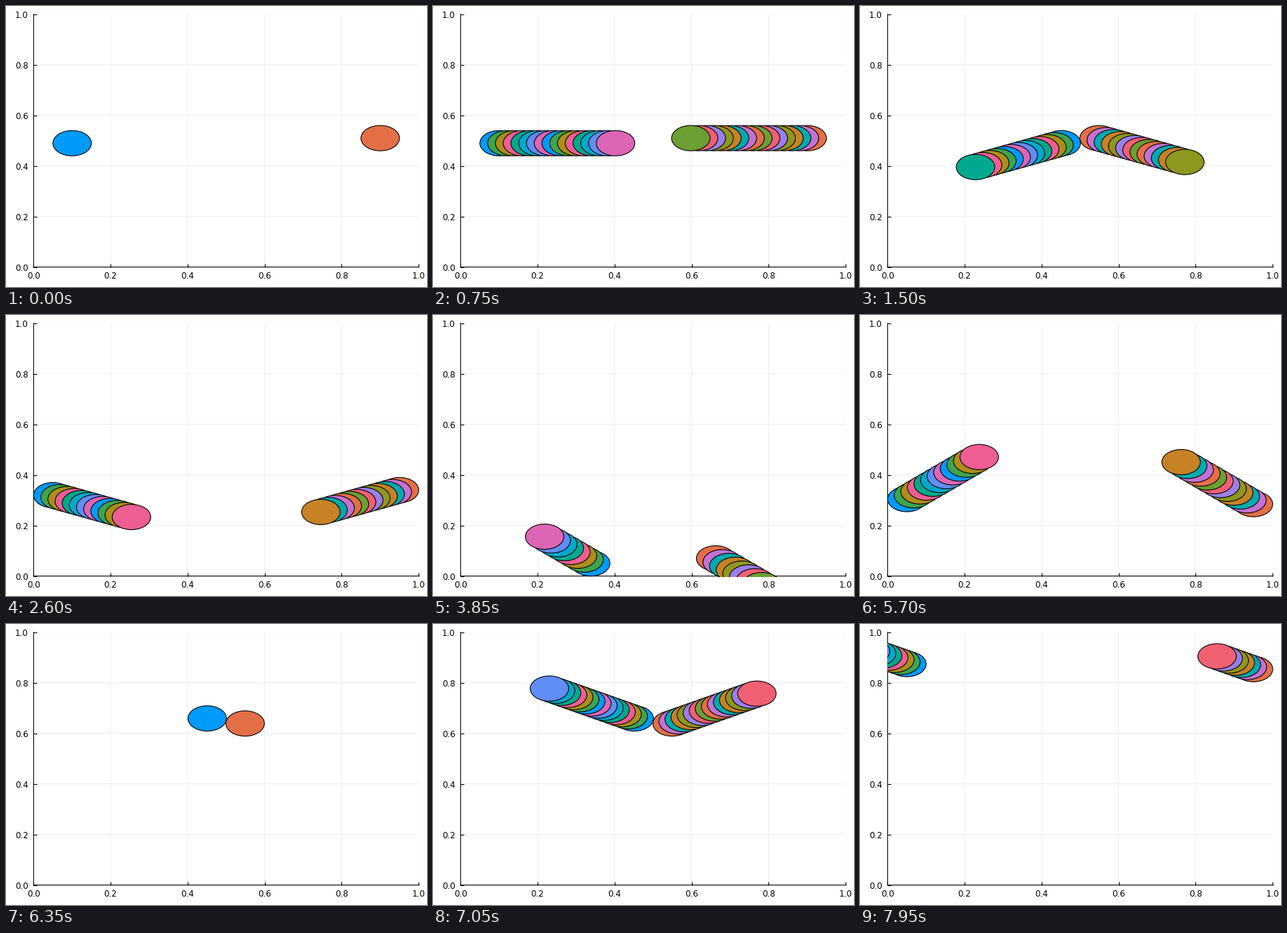
Recreate the animation shown at these times as a matplotlib script. Size 600 px wide and 400 px high, loop 8 s.

```python
from math import floor, sqrt

import matplotlib.pyplot as plt
import numpy as np
from matplotlib.animation import FuncAnimation
from matplotlib.patches import Ellipse
from matplotlib.transforms import Bbox

W, H, DPI = 600, 400, 100
LEFT, RIGHT, TOP, BOTTOM = 39.37, 588.19, 11.81, 371.6
FRAMES, STEP_MS = 160, 50
PX = 72 / DPI

RADIUS = 0.05
SPEED = 0.02015
OFFSET = 0.02       # height difference of the two balls
HIT = 0.1004        # distance of the centres at a collision
NORMAL = np.array([sqrt(HIT**2 - OFFSET**2), OFFSET]) / HIT
MEET = 0.5 - HIT * NORMAL[0] / 2

PALETTE = [
    "#009AFA", "#E36F47", "#3EA44E", "#C371D2", "#AC8E18", "#00AAAE",
    "#ED5E93", "#C68225", "#00A98D", "#8E971E", "#00A9CC", "#9B7FE9",
    "#618DF6", "#F06073", "#DD65B6", "#6C9F33",
]


class Motion:
    """Straight flights between collisions; rows are left and right ball."""

    def __init__(self):
        self.pos = np.array([[0.1, 0.5 - OFFSET / 2], [0.9, 0.5 + OFFSET / 2]])
        self.vel = np.array([[SPEED, 0.0], [-SPEED, 0.0]])
        self.frame = 0
        self.flights = []

    def time_to(self, target, ball=0, axis=0):
        return (target - self.pos[ball, axis]) / self.vel[ball, axis]

    def fly(self, shown, moved=None):
        """Show a flight for some time; the state may advance by less."""
        self.flights.append((self.frame, self.pos.copy(), self.vel.copy()))
        self.frame += floor(shown) + 1
        self.pos += self.vel * (shown if moved is None else moved)

    def bump(self):
        self.fly(self.time_to(MEET))
        push = 2 * self.vel[0, 0] * NORMAL[0] * NORMAL
        self.vel -= [push, push * [-1, 1]]

    def run(self):
        self.bump()
        self.fly(self.time_to(RADIUS))
        self.fly(0)
        self.vel[:, 0] *= -1
        self.bump()
        self.fly(self.time_to(RADIUS, axis=1))
        self.vel[0, 1] *= -1
        # The right ball sinks through the floor, then is set back to it.
        self.fly(self.time_to(RADIUS), self.time_to(RADIUS, ball=1, axis=1))
        self.vel[1, 1] *= -1
        self.fly(self.time_to(RADIUS))
        self.vel[:, 0] *= -1
        self.bump()
        self.fly(self.time_to(RADIUS))
        # Only the right ball bounces; the left one slips through the wall.
        self.vel[1, 0] *= -1
        self.fly(FRAMES - self.frame)
        return self.flights


flights = Motion().run()
starts = [flight[0] for flight in flights] + [FRAMES]
longest = max(np.diff(starts))

plt.rcParams.update({"font.family": "DejaVu Sans", "path.snap": False})
fig = plt.figure(figsize=(W / DPI, H / DPI), dpi=DPI, facecolor="white")
ax = fig.add_axes([LEFT / W, 1 - BOTTOM / H,
                   (RIGHT - LEFT) / W, (BOTTOM - TOP) / H])
clip = Bbox.from_extents(floor(LEFT), H - floor(BOTTOM) - 2,
                         floor(RIGHT) + 1, H - floor(TOP))


def style_axes():
    ticks = np.arange(6) / 5
    ax.set(xlim=(0, 1), ylim=(0, 1), xticks=ticks, yticks=ticks)
    ax.set_axisbelow(True)
    ax.grid(color="black", alpha=0.1, linewidth=0.6 * PX)
    ax.tick_params(direction="in", length=5 * PX, width=1.1 * PX,
                   labelsize=8.6)
    ax.tick_params(axis="x", pad=6.7 * PX)
    ax.tick_params(axis="y", pad=7.5 * PX)
    for label in ax.get_yticklabels():
        label.set_va("center_baseline")
    for side, spine in ax.spines.items():
        spine.set_visible(side in ("left", "bottom"))
        spine.set_linewidth(1.1 * PX)
        spine.set_zorder(0.6)


def make_ball(index):
    ball = Ellipse((0, 0), 2 * RADIUS, 2 * RADIUS, zorder=3 + index / 100,
                   facecolor=PALETTE[index % len(PALETTE)],
                   edgecolor="black", linewidth=1.1 * PX, visible=False)
    ax.add_patch(ball)
    ball.set_clip_box(clip)
    return ball


style_axes()
balls = [make_ball(i) for i in range(2 * longest)]


def draw(frame):
    start, pos, vel = [f for f in flights if f[0] <= frame][-1]
    for i, ball in enumerate(balls):
        step, side = divmod(i, 2)
        ball.set_visible(step <= frame - start)
        ball.set_center(pos[side] + step * vel[side])
    return balls


anim = FuncAnimation(fig, draw, frames=FRAMES, interval=STEP_MS,
                     init_func=lambda: draw(0), repeat=True, repeat_delay=0)
plt.show()
```
